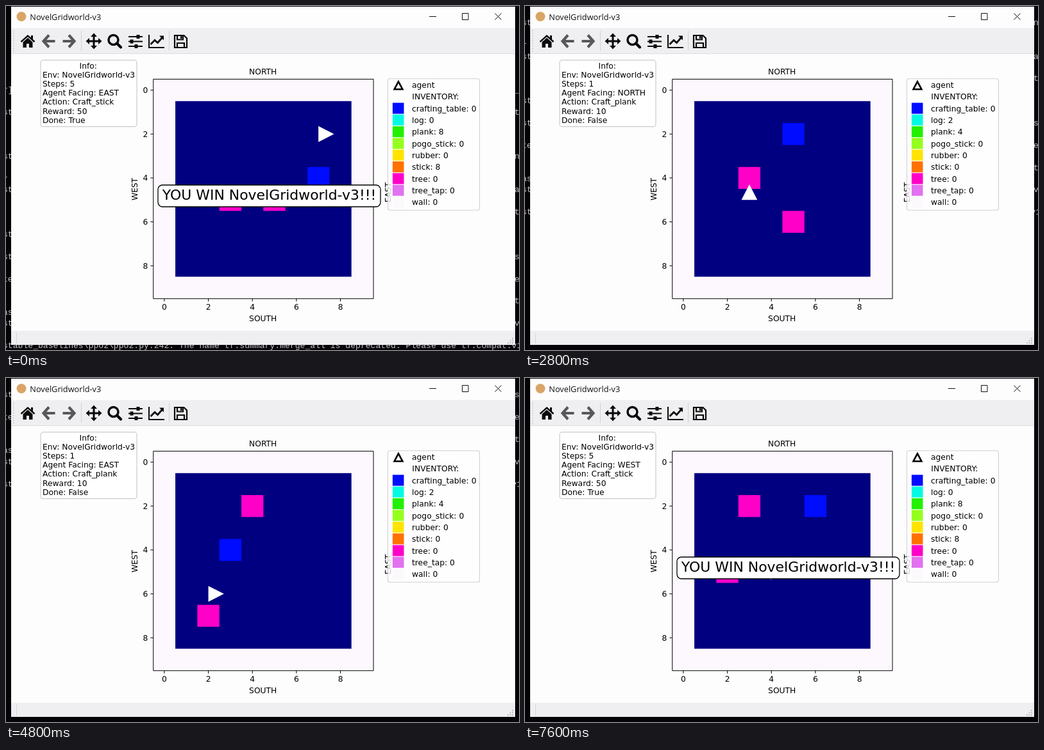
These frames come from a looping animation (800 by 538 pixels, 8 s). An HTML page with a canvas:

```html
<!DOCTYPE html>
<html lang="en">
<head>
<meta charset="utf-8">
<title>Gridworld</title>
<style>
html, body { margin: 0; width: 100%; height: 100%; overflow: hidden; background: #060308; }
canvas { display: block; }
</style>
</head>
<body>
<canvas id="stage" width="800" height="538"></canvas>
<script>
const ctx = document.getElementById('stage').getContext('2d');
const LOOP = 8000, FRAME = 100;
const PLOT = '"DejaVu Sans", sans-serif';
const MONO = '"Liberation Mono", monospace';
const SIZE = 12.3, CELL = 34.33;
const ROW = 17.4;

const ITEMS = [
  ['crafting_table', '#000cff'], ['log', '#00fae4'], ['plank', '#22f000'],
  ['pogo_stick', '#95ff1e'], ['rubber', '#ffe400'], ['stick', '#ff7200'],
  ['tree', '#ff00c8'], ['tree_tap', '#e272f0'], ['wall', '#fcf9fd']
];
const TREE = '#ff00c8', TABLE = '#000cff', FLOOR = '#000080';

// start: time of the first step; pace: ms per step
const EPISODES = [
  { start: -2000, pace: 250, trees: [[3, 5], [5, 5]], table: [7, 4], agent: [7, 2], face: 'EAST' },
  { start: 800, pace: 200, trees: [[7, 5], [3, 6]], table: [4, 5], agent: [4, 7], face: 'EAST' },
  { start: 2750, pace: 250, trees: [[3, 4], [5, 6]], table: [5, 2], agent: [3, 5], face: 'NORTH' },
  { start: 4600, pace: 240, trees: [[4, 2], [2, 7]], table: [3, 4], agent: [2, 6], face: 'EAST' },
  { start: 6500, pace: 250, trees: [[3, 2], [2, 5]], table: [6, 2], agent: [4, 5], face: 'WEST' }
];
const PLANKS = [4, 8, 12, 10, 8], STICKS = [0, 0, 0, 4, 8];
const ANGLE = { EAST: 0, WEST: Math.PI, NORTH: -Math.PI / 2 };

// [time, rows scrolled]
const SCROLL = [[0, 0], [700, 2], [900, 3], [1600, 7], [1800, 9], [3500, 15],
  [4800, 21], [5900, 27], [6400, 27], [6800, 31]];
// [rows above the last one, left edge, right edge]
const LOG = [[2, 'st', 'v'], [3, 'as', ''], [4, '', 't'], [6, 'te', 'e'], [8, 'st', 's'],
  [10, 'st', ''], [12, '', 't'], [14, 'st', 'a'], [15, 'r', ''], [17, 'st', 'n'],
  [21, 'st', 't'], [23, 'r]', '_']];
const LAST = 'stable_baselines\\ppo2\\ppo2.py:242: The name tf.summary.merge_all is deprecated. Please use tf.compat.v1';

const gx = c => 246.9 + CELL * c;
const gy = r => 131.6 + CELL * r;

function box(x, y, w, h, fill) {
  ctx.fillStyle = fill;
  ctx.fillRect(x, y, w, h);
}

function text(str, x, y, align = 'left', font = `${SIZE}px ${PLOT}`, fill = '#000') {
  ctx.font = font;
  ctx.textAlign = align;
  ctx.fillStyle = fill;
  ctx.fillText(str, x, y);
}

function upright(str, x, y) {
  ctx.save();
  ctx.translate(x, y);
  ctx.rotate(-Math.PI / 2);
  text(str, 0, 0, 'center');
  ctx.restore();
}

function rounded(x, y, w, h, r, fill, stroke, width) {
  ctx.beginPath();
  ctx.roundRect(x, y, w, h, r);
  ctx.fillStyle = fill;
  ctx.fill();
  ctx.lineWidth = width;
  ctx.strokeStyle = stroke;
  ctx.stroke();
}

function line(path, color, width, cap = 'butt') {
  ctx.strokeStyle = color;
  ctx.lineWidth = width;
  ctx.lineCap = cap;
  ctx.stroke(new Path2D(path));
}

function shape(path, fill) {
  ctx.fillStyle = fill;
  ctx.fill(new Path2D(path), 'evenodd');
}

function disc(x, y, r, fill) {
  ctx.beginPath();
  ctx.arc(x, y, r, 0, 7);
  ctx.fillStyle = fill;
  ctx.fill();
}

function scrolled(t) {
  const i = SCROLL.findIndex(k => k[0] > t);
  if (i < 0) return SCROLL[SCROLL.length - 1][1];
  const [t0, a] = SCROLL[i - 1], [t1, b] = SCROLL[i];
  return Math.floor(a + (b - a) * (t - t0) / (t1 - t0) + 1e-6);
}

function drawConsole(t) {
  box(0, 0, 800, 538, '#060308');
  const font = `13.1px ${MONO}`, grey = '#c4c1c6';
  const y = 535 - scrolled(t) * ROW;
  text(LAST, -5, y, 'left', font, grey);
  for (const [up, left, right] of LOG) {
    text(left, -5, y - up * ROW, 'left', font, grey);
    text(right, 793, y - up * ROW, 'left', font, grey);
  }
}

function drawArrow(x, dir, color) {
  line(`M${x + 8 * dir} 55H${x - 9.5 * dir}M${x} 45.5L${x + 8.5 * dir} 55L${x} 64.5`, color, 4.2);
}

function drawToolbar() {
  const ink = '#0a0a0a';
  for (let y = 38; y < 72; y += 4) box(11, y, 1.5, 1.5, '#c4c3c6');
  box(117, 39, 1, 31, '#d2d1d4');
  box(254, 39, 1, 31, '#d2d1d4');

  line('M23.5 56L34 46.5L44.5 56', ink, 2.4);
  box(39, 46, 3, 6, ink);
  shape('M26.5 56.5L34 49.8L41.5 56.5V65H36V59H32V65H26.5Z', ink);

  drawArrow(67, -1, '#58575a');
  drawArrow(98, 1, '#58575a');

  line('M128 55H146M137 46V64', ink, 3);
  shape('M137 42.5L142 48H132ZM137 67.5L142 62H132ZM124.5 55L130 50V60ZM149.5 55L144 50V60Z', ink);

  ctx.beginPath();
  ctx.arc(167.5, 53, 7.5, 0, 7);
  ctx.strokeStyle = ink;
  ctx.lineWidth = 3.5;
  ctx.stroke();
  line('M173 58.5L179 64.5', ink, 4.4, 'round');

  [[48, 206], [55.5, 196], [63, 203]].forEach(([y, x]) => {
    line(`M191 ${y}H213`, ink, 2);
    box(x - 2.5, y - 3, 5, 6, ink);
  });

  line('M223 45V65H247', ink, 2);
  line('M225.5 60L232 53.5L236.5 57.5L243.5 49.5', ink, 2.8);
  shape('M239 46.5H246V53.5Z', ink);

  line('M263 46H277.5L282 50.5V65H263Z', ink, 2.2);
  line('M267 46V52.5H276V46M267 65V58H278V65', ink, 2.2);
  box(272, 47, 2.5, 4, ink);
}

function drawWindow() {
  box(8, 1, 786, 529, '#fefdfe');
  box(8, 34.5, 786, 39.5, '#efeef0');
  box(8, 74, 786, 1, '#dddcde');
  box(8, 508, 786, 22, '#efeef0');
  box(16, 511, 1, 17, '#d6d5d8');
  for (let i = 0; i < 3; i++)
    for (let j = 0; j <= i; j++) box(789 - 3.5 * j, 519 + 3.5 * i, 2, 2, '#bdbcc0');

  disc(24, 16.5, 7.5, '#d8a566');
  text('NovelGridworld-v3', 37.3, 21.5, 'left', '12.75px "Open Sans", sans-serif', '#111');
  line('M660 16.5H671M711.5 11.5H721V21.5H711.5ZM762.5 11.5L772.5 21.5M772.5 11.5L762.5 21.5', '#111', 1);
  drawToolbar();
}

function drawCells(c, r, n, color) {
  box(gx(c - 0.5), gy(r - 0.5), n * CELL, n * CELL, color);
}

function drawGrid(ep) {
  const left = gx(-0.5), right = gx(9.5), top = gy(-0.5), bottom = gy(9.5);
  drawCells(0, 0, 10, '#fdf8fe');
  drawCells(1, 1, 8, FLOOR);
  ep.trees.forEach(([c, r]) => drawCells(c, r, 1, TREE));
  drawCells(...ep.table, 1, TABLE);

  ctx.save();
  ctx.translate(gx(ep.agent[0]), gy(ep.agent[1]));
  ctx.rotate(ANGLE[ep.face]);
  shape('M0 -12.4L24.3 0L0 12.4Z', '#fff');
  ctx.restore();

  line(`M${left} ${top}H${right}V${bottom}H${left}Z`, '#000', 1);
  for (let n = 0; n < 10; n += 2) {
    const x = gx(n), y = gy(n);
    line(`M${x} ${bottom}v4.4M${left} ${y}h-4.4`, '#000', 1);
    text(n, x, 475, 'center');
    text(n, 221.3, y + 4.5, 'right');
  }
  text('NORTH', 400.7, 106.7, 'center');
  text('SOUTH', 400.7, 493, 'center');
  upright('WEST', 205.3, 286.5);
  upright('EAST', 600, 291.5);
}

function drawLegend(step) {
  const count = { log: Math.max(0, 3 - step), plank: PLANKS[step - 1], stick: STICKS[step - 1] };
  rounded(595.5, 113.8, 143, 205.5, 3, 'rgba(255,255,255,.8)', '#d0cfd2', 1.1);
  line('M612 118.2L605.6 130.3H618.4Z', '#000', 2.6);
  const base = i => 128.1 + 18.32 * i;
  text('agent', 633, base(0));
  text('INVENTORY:', 633.3, base(1));
  ITEMS.forEach(([name, color], i) => {
    box(602.9, 151.4 + 18.32 * i, 17.6, 17.2, color);
    text(`${name}: ${count[name] || 0}`, 633, base(i + 2));
  });
}

function drawInfo(ep, step) {
  const won = step === 5;
  rounded(54, 84.7, 150, 104, 4, '#fff', '#cbcacd', 1.2);
  text('Info:', 128.3, 98, 'center');
  [
    'Env: NovelGridworld-v3',
    `Steps: ${step}`,
    `Agent Facing: ${ep.face}`,
    `Action: ${step < 4 ? 'Craft_plank' : 'Craft_stick'}`,
    `Reward: ${won ? 50 : 10}`,
    `Done: ${won ? 'True' : 'False'}`
  ].forEach((s, i) => text(s, 57, 112.1 + 14.13 * i));
}

function drawBanner() {
  rounded(237, 280, 347, 34, 7, '#fff', '#000', 1.3);
  text('YOU WIN NovelGridworld-v3!!!', 410.5, 303.3, 'center', `21.95px ${PLOT}`);
}

function draw(t) {
  const ep = EPISODES.filter(e => e.start <= t).pop();
  const step = Math.min(5, 1 + Math.floor((t - ep.start) / ep.pace));
  drawConsole(t);
  drawWindow();
  drawGrid(ep);
  drawLegend(step);
  drawInfo(ep, step);
  if (step === 5) drawBanner();
}

function tick() {
  const t = performance.now() % LOOP;
  draw(Math.floor(t / FRAME) * FRAME);
  requestAnimationFrame(tick);
}
tick();
</script>
</body>
</html>
```
